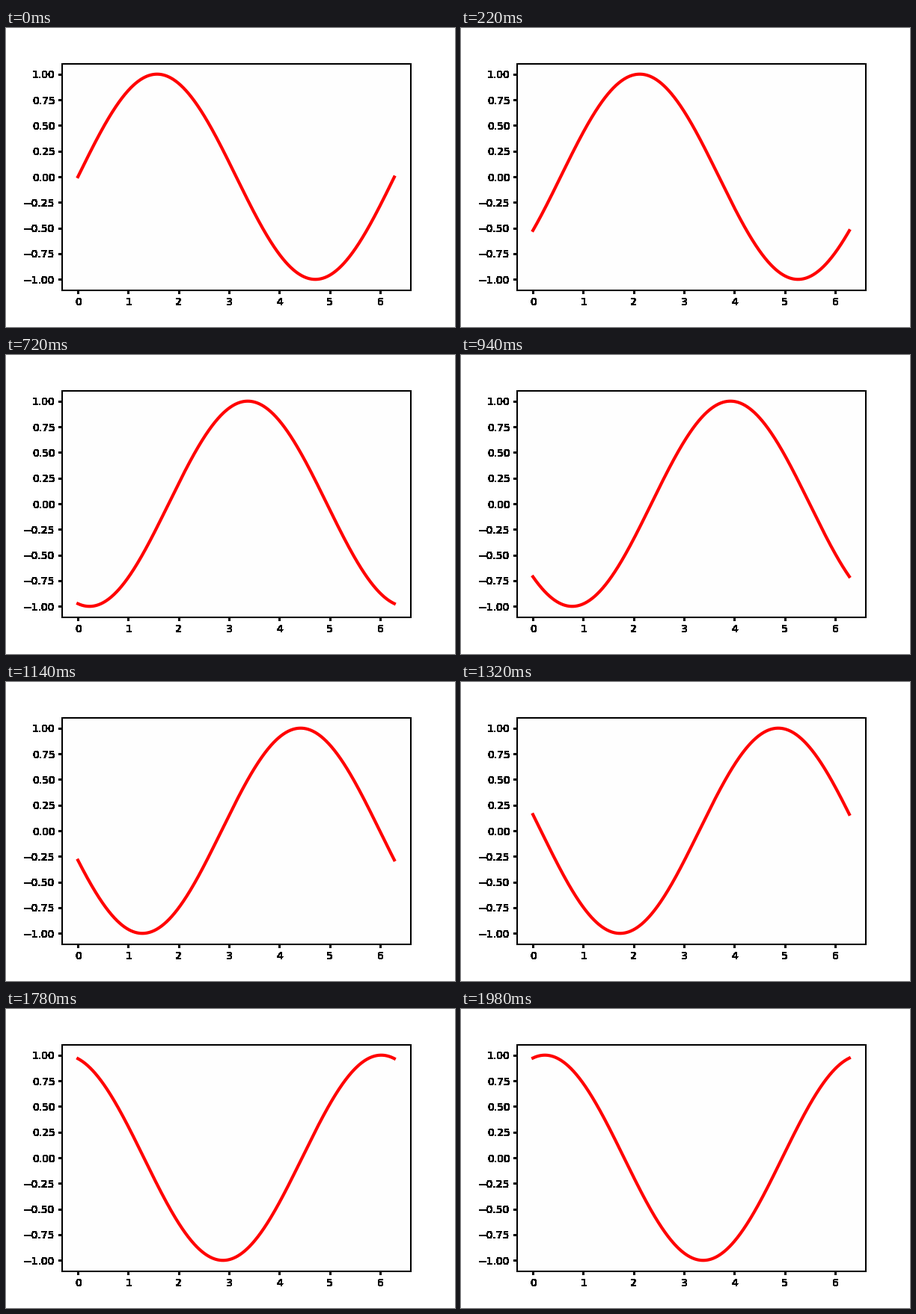
A matplotlib script for the animation above (2000 ms loop, 600 by 400 pixels).

```python
import numpy as np
import matplotlib.pyplot as plt
from matplotlib.animation import FuncAnimation

FRAMES = 100
INTERVAL = 20
STEP = 0.05


def harden(img, dpi):
    """Make every touched pixel opaque, so outer edges are crisp."""
    img = img.copy()
    img[..., 3] = img[..., 3] > 0
    return img, 0, 0


fig, ax = plt.subplots(figsize=(6, 4), dpi=100, facecolor="white")
fig.subplots_adjust(left=0.125, right=0.9, bottom=0.125, top=0.88)
ax.set_facecolor("#fefefe")
ax.set_agg_filter(harden)

x = np.arange(0, 2 * np.pi, 0.01)
line, = ax.plot(x, np.sin(x), color="red", linewidth=3)


def update(i):
    line.set_ydata(np.sin(x - STEP * i))
    return line,


anim = FuncAnimation(fig, update, frames=FRAMES, interval=INTERVAL,
                     repeat=True, repeat_delay=0)
plt.show()
```
